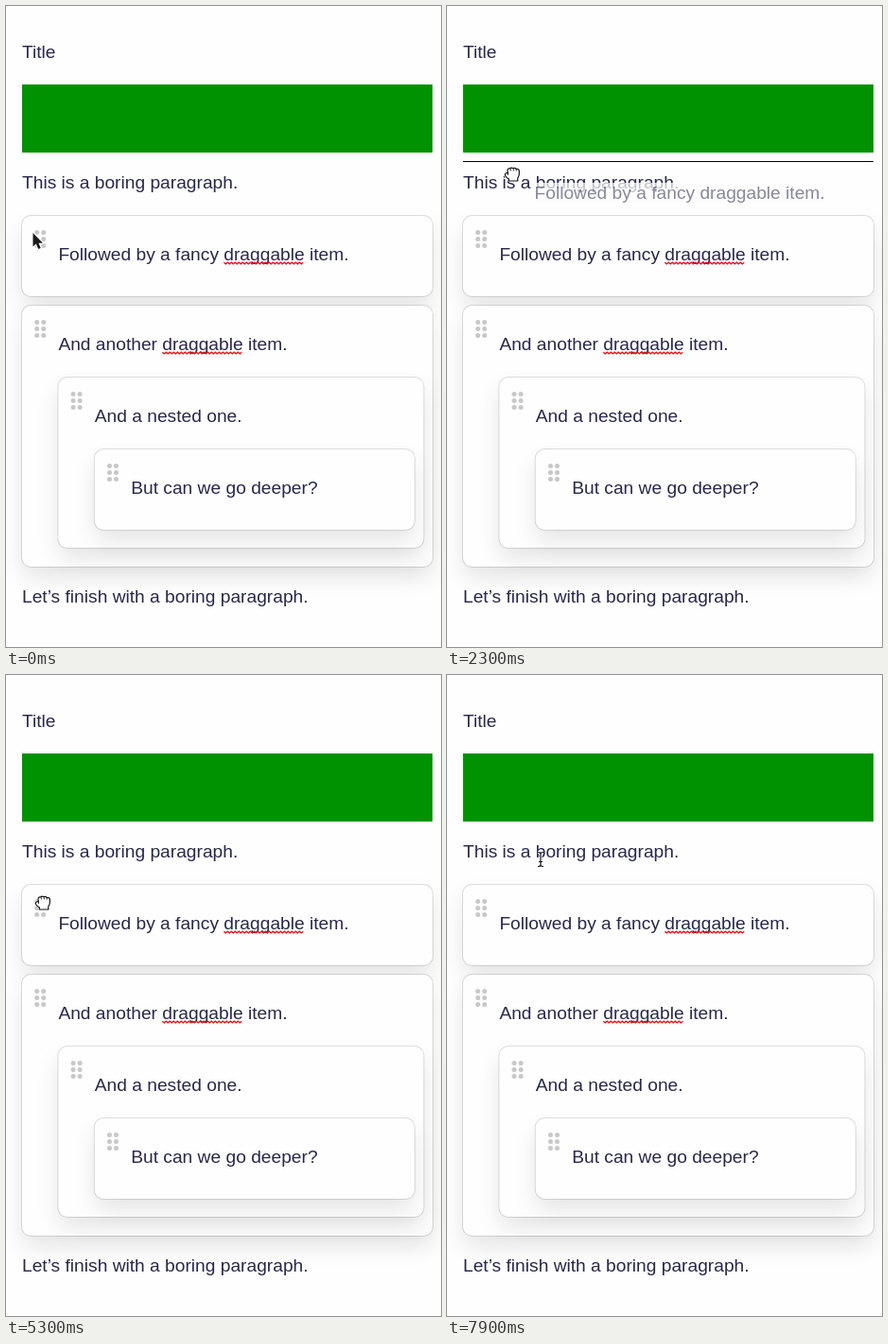
These frames come from a looping animation (460 by 678 pixels, 8 s). An HTML page with a canvas:

```html
<!DOCTYPE html>
<html lang="en">
<head>
<meta charset="utf-8">
<title>Draggable items</title>
<style>
  html, body { margin: 0; width: 100%; height: 100%; overflow: hidden; background: #fefefe; }
  canvas { display: block; }
</style>
</head>
<body>
<canvas id="stage" width="460" height="678"></canvas>
<script>
const ctx = document.getElementById('stage').getContext('2d');
const LOOP = 8000, STEP = 100;
const PAPER = '#fefefe', INK = '#28284a';
const FONT = '19.2px "Liberation Sans", Arial, sans-serif';
const FANCY = ['Followed by a fancy ', 'draggable', ' item.'];
const LEFT = 17, RIGHT = 451, INDENT = 38.4, GAP = 9.6;

const ARROW = new Path2D('M0 0V14.6L3.3 11.6L5.7 17L8.2 15.9L5.9 10.7H10.4Z');
const FIST = new Path2D('M-4.6-1.2L-5-4Q-4.8-6.6-2.6-6Q-.8-7.5.8-6.2Q2.8-7.1 4-5.6' +
  'Q7.2-6 7.4-3Q7.8 1 5.8 4V7H-3.6V5Q-6 3.8-7.6 1.2Q-8-1.8-4.6-1.2Z');
const FOLDS = new Path2D('M-4.6-1.2V1M-1.6-5.6V-3.6M1.4-5.6V-3.6M4.2-5.2V-3.4');
const BEAM = new Path2D('M-3-7.5Q0-7.5 0-6Q0-7.5 3-7.5M0-6V6M-3 7.5Q0 7.5 0 6Q0 7.5 3 7.5M-2 2.5H2');

// The hand presses at grab, carries the label to over, may nudge it to rest, then drops it.
// hold is the label's offset from the hand.
const drags = [
  { press: 300, lift: 500, arrive: 1300, drop: 2400, hold: [23.5, 26],
    grab: [35.5, 249], over: [62, 163], nudge: 1800, rest: [69, 178] },
  { press: 3300, lift: 3400, arrive: 4100, drop: 4400, hold: [21.5, 23],
    grab: [34, 194], over: [54, 297] },
  { press: 5100, lift: 5300, arrive: 6000, drop: 7500, hold: [18.5, 16],
    grab: [39, 241], over: [74, 172], nudge: 6600, rest: [90, 146], letGo: 7100 }
];
const TRAVEL = 400, LAG = 80;
const TIP = [-7, -9];
const EXIT = [106, 204], BEAM_TIME = 7800;

const legs = drags.flatMap(d => [
  [d.press - TRAVEL, d.press, d.grab],
  [d.lift, d.arrive, d.over],
  ...(d.rest ? [[d.nudge, d.nudge + TRAVEL, d.rest]] : [])
]);
legs.push([7500, 7900, EXIT]);

function ease(t, from, to) {
  const p = Math.min(1, Math.max(0, (t - from) / (to - from)));
  return 1 - (1 - p) ** 1.7;
}

function handAt(t) {
  return legs.reduce(([x, y], [from, to, [tx, ty]]) => {
    const e = ease(t, from, to);
    return [x + (tx - x) * e, y + (ty - y) * e];
  }, drags[0].grab);
}

function text(str, x, y, color = INK) {
  ctx.fillStyle = color;
  ctx.fillText(str, x, y);
}

function squiggle(x, y, w) {
  ctx.beginPath();
  for (let i = 0; i <= w; i += 2) ctx.lineTo(x + i, y + (i % 4 ? 0.8 : -0.8));
  ctx.strokeStyle = '#e8141c';
  ctx.lineWidth = 1.3;
  ctx.stroke();
}

// Words at odd positions are marked as misspelt
function spelled(words, x, y) {
  words.forEach((word, i) => {
    const w = ctx.measureText(word).width;
    text(word, x, y);
    if (i % 2) squiggle(x, y + 3, w);
    x += w;
  });
}

function box(x, y, w, h, r, color) {
  ctx.fillStyle = color;
  ctx.beginPath();
  ctx.roundRect(x, y, w, h, r);
  ctx.fill();
}

function card(depth, y, h, words, textY = y + 47) {
  const x = LEFT + depth * INDENT, w = RIGHT - depth * GAP - x;
  ctx.save();
  ctx.shadowColor = 'rgba(0,0,0,.1)';
  ctx.shadowBlur = 24;
  ctx.shadowOffsetY = 12;
  box(x, y, w, h, 9.6, PAPER);
  ctx.restore();
  box(x - 1, y - 1, w + 2, h + 2, 10.6, 'rgba(0,0,0,.12)');
  box(x, y, w, h, 9.6, PAPER);
  for (let i = 0; i < 6; i++) {
    box(x + 13.2 + (i % 2) * 7, y + 15 + (i >> 1) * 7, 5, 5, 2.5, '#c8c8c8');
  }
  spelled(words, x + INDENT, textY);
}

function page(swapped) {
  ctx.fillStyle = PAPER;
  ctx.fillRect(0, 0, 460, 678);
  text('Title', LEFT, 55);
  if (swapped) card(0, 165, 85, FANCY, 213);
  else card(0, 222, 85, FANCY);
  card(0, 317, 276, ['And another ', 'draggable', ' item.']);
  card(1, 393, 180, ['And a nested one.']);
  card(2, 469, 85, ['But can we go deeper?']);
  ctx.fillStyle = '#009200';
  ctx.fillRect(LEFT, 83, RIGHT - LEFT, 72);
  text('This is a boring paragraph.', LEFT, swapped ? 289 : 193);
  text('Let’s finish with a boring paragraph.', LEFT, 631);
}

// Marks the gap nearest to the hand
function dropLine(swapped, y) {
  const rule = (top, h) => ctx.fillRect(LEFT, top, RIGHT - LEFT, h);
  ctx.fillStyle = '#000';
  if (swapped) {
    if (y > 207) rule(y > 283 ? 306 : 259, 2);
  } else if (y < 187) rule(164, 1);
  else rule(211, 2);
}

function dragged(x, y) {
  const label = FANCY.join('');
  ctx.fillStyle = 'rgba(254,254,254,.72)';
  ctx.fillRect(x, y - 17, ctx.measureText(label).width, 21);
  text(label, x, y, 'rgba(40,40,74,.55)');
}

function outline(path, color, width) {
  ctx.strokeStyle = color;
  ctx.lineWidth = width;
  ctx.stroke(path);
}

function solid(path, fill, edge, width) {
  outline(path, edge, width);
  ctx.fillStyle = fill;
  ctx.fill(path);
}

function cursor(t, x, y, pressed) {
  ctx.save();
  ctx.translate(x, y);
  ctx.lineJoin = 'round';
  if (pressed) {
    solid(FIST, '#fff', '#fff', 2.2);
    outline(FIST, '#111', 1.2);
    outline(FOLDS, '#111', 0.9);
  } else {
    ctx.translate(...TIP);
    if (t >= BEAM_TIME) {
      outline(BEAM, '#fff', 3);
      outline(BEAM, '#111', 1.2);
    } else {
      solid(ARROW, '#1a1a1a', '#fff', 2.2);
    }
  }
  ctx.restore();
}

function draw(now) {
  const t = Math.floor((now % LOOP) / STEP) * STEP;
  const swapped = t >= drags[0].drop && t < drags[1].drop;
  const drag = drags.find(d => t >= d.press && t < d.drop);
  const [x, y] = handAt(t);
  ctx.font = FONT;
  page(swapped);
  if (drag && t > drag.lift) {
    dropLine(swapped, y);
    // The label trails the hand vertically
    if (t < (drag.letGo ?? drag.drop)) {
      dragged(x + drag.hold[0], handAt(t - LAG)[1] + drag.hold[1]);
    }
  }
  cursor(t, x, y, drag);
}

let start;
function tick(now) {
  start ??= now;
  draw(now - start);
  requestAnimationFrame(tick);
}
draw(0);
requestAnimationFrame(tick);
</script>
</body>
</html>
```
